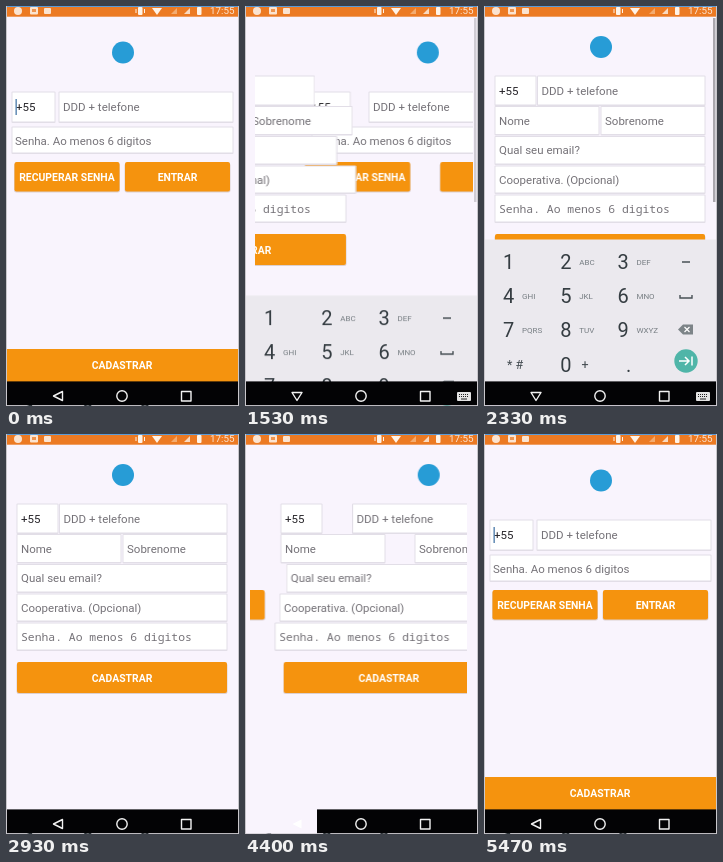
Recreate the animation shown at these times as an HTML page. Size 233x400 px, loop 5.54 s.

```html
<!DOCTYPE html>
<html lang="pt">
<head>
<meta charset="utf-8">
<title>Cadastro</title>
<style>
html, body { margin: 0; width: 100%; height: 100%; overflow: hidden; background: #f9f4fd; }
svg { display: block; width: 100vw; height: 100vh; }
text { font-family: Roboto, "Open Sans", sans-serif; font-size: 11.5px; fill: #757278; white-space: pre; }
.value { fill: #27252a; }
.mono { font-family: "Noto Sans Mono", "DejaVu Sans Mono", monospace; font-size: 11.4px; }
.label { font-size: 10.4px; font-weight: 700; fill: #fff; text-anchor: middle; }
.clock { font-size: 9.8px; fill: #fbe6d6; }
.digit { font-size: 20px; fill: #353d42; }
.sub { font-size: 8px; fill: #777e83; }
.sign { font-size: 12.5px; fill: #454d52; }
.line { fill: none; stroke: #f2f2f2; stroke-width: 1.4; stroke-linejoin: round; }
</style>
</head>
<body>
<svg id="stage" viewBox="0 0 233 400" preserveAspectRatio="none"></svg>
<script>
const LOOP = 5540;
const EASE_OUT = 'cubic-bezier(.333,1,.667,1)';
const EASE_IN = 'cubic-bezier(.333,0,.667,.333)';
let rules = '', count = 0;

// stops: [ms, css declarations, easing to the next stop]
function animate(stops) {
  const name = 'a' + count++;
  const body = stops.map(([ms, css, ease = 'linear']) =>
    `${(ms / LOOP * 100).toFixed(3)}%{${css};animation-timing-function:${ease}}`).join('');
  rules += `@keyframes ${name}{${body}}`;
  return `style="animation:${name} ${LOOP}ms infinite"`;
}

const shift = (x, y = 0) => `transform:translate(${x}px,${y}px)`;
const group = (attr, inner) => `<g ${attr}>${inner}</g>`;

// Visibility flips at each of the given times
function toggle(on, ...times) {
  const stops = [0, ...times].map((ms, i) => [ms, `opacity:${+(on === (i % 2 === 0))}`, 'step-end']);
  return animate([...stops, [LOOP, stops[stops.length - 1][1]]]);
}

const rect = (x, y, w, h, fill, r = 0) =>
  `<rect x="${x}" y="${y}" width="${w}" height="${h}" rx="${r}" fill="${fill}"/>`;
const path = (d, attr = 'class="line"') => `<path d="${d}" ${attr}/>`;
const text = (x, y, s, cls = '') => `<text x="${x}" y="${y}" class="${cls}">${s}</text>`;
const caret = (x, y) => rect(x, y, 1.3, 16, '#4878a8');
const emblem = y => `<circle cx="117" cy="${y}" r="11" fill="#279cd6"/>`;

function field(x, y, w, h, s, base, cls, pad = 4) {
  return rect(x - .5, y - .5, w + 1, h + 1.5, '#e2dee7', 1) + rect(x + .5, y + .5, w - 1, h - 1, '#fff') +
    text(x + pad, base, s, cls);
}

function button(x, y, w, h, s) {
  return rect(x - .5, y + 1, w + 1, h, '#dccfcf', 2.5) + rect(x, y, w, h, '#f5930e', 2) +
    text(x + w / 2, y + h / 2 + 4, s, 'label');
}

// Leaves to the right, later returns from the left
const loginItem = (out, back, inner) => group(animate([
  [0, shift(0)], [out, shift(0), EASE_IN], [out + 250, shift(240), 'step-end'],
  [out + 251, shift(-240)], [back, shift(-240), EASE_OUT], [back + 500, shift(0)], [LOOP, shift(0)]
]), inner);

// Arrives from the left, later leaves to the right
const signupItem = (start, out, inner) => group(animate([
  [0, shift(-240)], [start, shift(-240), EASE_OUT], [start + 500, shift(0)],
  [out, shift(0), EASE_IN], [out + 400, shift(240)], [LOOP, shift(240)]
]), inner);

const statusBar = rect(0, 0, 233, 10.7, '#ec7a23') + rect(0, 0, 233, 1, '#5b9bd8') +
  '<circle cx="12" cy="5" r="4" fill="#fbe3d0"/>' +
  rect(24, 1, 8, 7.5, '#fbe3d0', 1) + rect(26, 3, 4, 3, '#ee9450') + rect(38, 2, 7, 6, '#fbe3d0', 1) +
  rect(132, 1, 4.5, 8, '#fff3e8', 1) + path('M130 3v4M138.5 3v4', 'stroke="#fff3e8"') +
  path('M146 2h10l-5 7z', 'fill="#fff3e8"') + path('M165 8l6 -6v6z', 'fill="#f3ab70"') +
  path('M178 8l6 -6v6z', 'fill="#f9d9c0"') + rect(191, 1, 4.5, 8, '#fff3e8', 1) +
  text(204, 8, '17:55', 'clock') +
  group(toggle(false, 1610, 1740), rect(148, 2, 84, 9, '#f9e2d5'));

const login = group('clip-path="url(#loginClip)"',
  loginItem(1400, 4350, emblem(46.5)) +
  loginItem(1410, 4365, field(6, 86, 43, 30, '+55', 105, 'value') +
    group(toggle(true, 500, 1000, 1400, 5000), caret(9.5, 93))) +
  loginItem(1395, 4400, field(53, 86, 174, 30, 'DDD + telefone', 105)) +
  loginItem(1405, 4400, field(6, 121, 221, 26, 'Senha. Ao menos 6 digitos', 138.5, '', 3)) +
  loginItem(1415, 4360, button(8.5, 156, 105, 29.5, 'RECUPERAR SENHA')) +
  loginItem(1390, 4375, button(119, 156, 105, 29.5, 'ENTRAR')));

const signup = group('clip-path="url(#signupClip)"',
  signupItem(1500, 4190, emblem(41)) +
  signupItem(1470, 4272, field(11, 70, 41, 29, '+55', 89, 'value')) +
  signupItem(1460, 4211, field(53.5, 70, 167.5, 29, 'DDD + telefone', 89) +
    group(toggle(false, 2400, 2900, 3400, 3900), caret(57.5, 77))) +
  signupItem(1487, 4272, field(11, 100.5, 104, 28, 'Nome', 118.5)) +
  signupItem(1421, 4213, field(117, 100.5, 104, 28, 'Sobrenome', 118.5)) +
  signupItem(1438, 4258, field(11, 130.5, 210, 27.5, 'Qual seu email?', 148)) +
  signupItem(1417, 4275, field(11, 160, 210, 27, 'Cooperativa. (Opcional)', 177.5)) +
  signupItem(1428, 4288, field(11, 189, 210, 27, 'Senha. Ao menos 6 digitos', 207, 'mono')) +
  signupItem(1428, 4265, button(11, 228, 210, 31, 'CADASTRAR')));

const bottomBar = group(toggle(true, 1450, 4520),
  rect(0, 343, 233, 33, '#f5930e') +
  group(animate([[0, 'opacity:0'], [1080, 'opacity:0'], [1180, 'opacity:1'], [1450, 'opacity:1'],
    [1500, 'opacity:0'], [LOOP, 'opacity:0']]), rect(0, 343, 233, 33, '#e5690d')) +
  text(116, 363, 'CADASTRAR', 'label'));

const scrollBar = group(animate([[0, 'opacity:0'], [1500, 'opacity:0'], [1560, 'opacity:1'],
  [2600, 'opacity:1'], [2800, 'opacity:0'], [LOOP, 'opacity:0']]), rect(229, 12, 2.5, 184, '#aaa7ae'));

const letters = ['', 'ABC', 'DEF', 'GHI', 'JKL', 'MNO', 'PQRS', 'TUV', 'WXYZ'];
const keys = letters.map((s, i) => {
  const x = 19 + i % 3 * 57.2, y = 263 + Math.floor(i / 3) * 34;
  return text(x, y, i + 1, 'digit') + text(x + 19, y - 4, s, 'sub');
}).join('');

const keyboard = group(animate([
  [0, shift(0, 150)], [1450, shift(0, 150), EASE_OUT], [1740, shift(0)],
  [2700, shift(0), EASE_IN], [2850, shift(0, 150)], [LOOP, shift(0, 150)]
]),
  rect(0, 233.5, 233, 145, '#ebe9ee') + keys +
  text(23, 363, '* #', 'sign') + text(76.2, 366, '0', 'digit') + text(97.5, 362.5, '+', 'sign') +
  text(142, 366, '.', 'digit') +
  path('M198 256h8M196 289v3h12v-3', 'fill="none" stroke="#485055" stroke-width="1.4"') +
  path('M194 323.5l5 -5h10v10h-10z', 'fill="#7d8488"') +
  path('M200.5 321l5 5m0 -5l-5 5', 'stroke="#fff" stroke-width="1.2"') +
  '<circle cx="202" cy="355" r="11.7" fill="#4fb5a8"/>' +
  path('M195 355h10m-4 -4l4 4l-4 4M208 350.5v9', 'fill="none" stroke="#fff" stroke-width="1.5"'));

const navBar = rect(0, 375.4, 233, 23.8, '#030305') +
  group(toggle(true, 1520, 2760), path('M56.5 385.5v9l-9 -4.5z')) +
  group(toggle(false, 1520, 2760), path('M47 386.5h10l-5 8z') +
    rect(212, 386, 14, 9, '#e4e4e4', 1) +
    path('M214 388.5h10M214 390.5h10', 'stroke="#222" stroke-dasharray="1 1"') +
    path('M216 393h6', 'stroke="#222"')) +
  '<circle cx="116" cy="390" r="5.2" class="line"/>' + path('M175.5 385.5h9.5v9.5h-9.5z') +
  group(toggle(false, 4330, 4480), rect(1, 375, 71, 24.5, '#f9f4fd') +
    path('M56.5 385.5v9l-9 -4.5z', 'fill="#fff"'));

const clips = `<defs><clipPath id="loginClip">${rect(5.5, 11, 222, 364, '#fff')}</clipPath>
  <clipPath id="signupClip">${rect(10, 11, 212, 364, '#fff')}</clipPath></defs>`;

document.getElementById('stage').innerHTML = clips + rect(0, 0, 233, 400, '#f9f4fd') +
  login + signup + scrollBar + bottomBar + keyboard + navBar + statusBar +
  path('M.5 0v400M232.5 0v400', 'stroke="#c9c7cc"');
document.head.appendChild(document.createElement('style')).textContent = rules;
</script>
</body>
</html>
```
